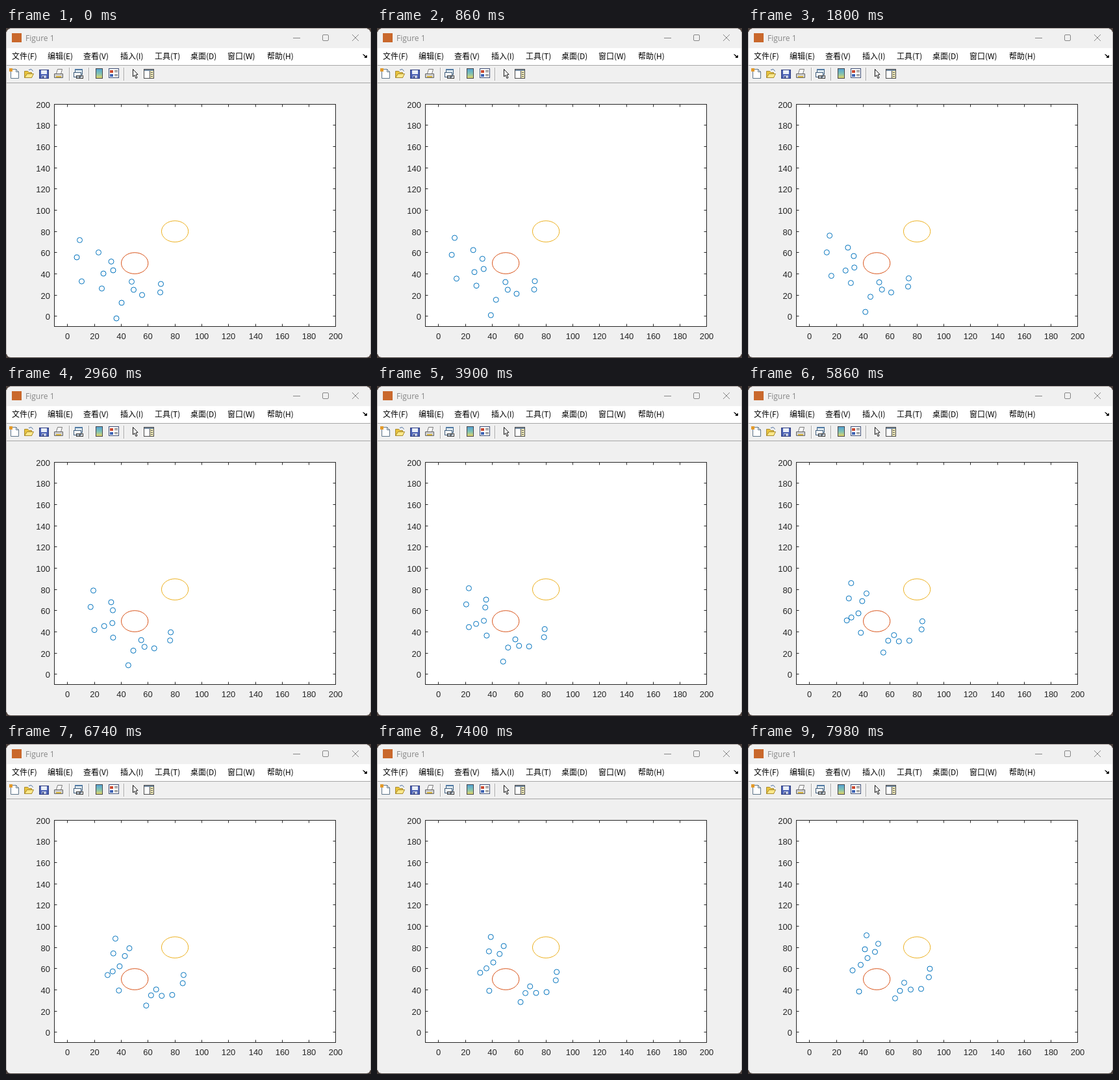
An HTML page with a canvas that plays this animation: 562x508 px, repeating every 8000 ms.

```html
<!DOCTYPE html>
<html lang="zh">
<head>
<meta charset="utf-8">
<title>Figure 1</title>
<style>
html, body { margin: 0; width: 100%; height: 100%; overflow: hidden; background: #f0f0f0; }
canvas { display: block; width: 562px; height: 508px; }
</style>
</head>
<body>
<canvas id="stage" width="562" height="508"></canvas>
<script>
const ctx = document.getElementById('stage').getContext('2d');
const LOOP = 8000, LAST_STEP = 171;
const PANEL = '#f0f0f0', INK = '#262626', GREY = '#868686', RULE = '#a6a6a6';
const BLUE = '#0072bd', ORANGE = '#d95319', YELLOW = '#edb120';

const AXES = { left: 74.3, right: 507.9, top: 117.3, bottom: 459.98 };
const UNIT_X = (AXES.right - AXES.left) / 210;
const UNIT_Y = (AXES.bottom - AXES.top) / 210;
const px = x => AXES.left + (x + 10) * UNIT_X;
const py = y => AXES.bottom - (y + 10) * UNIT_Y;
const snap = v => Math.floor(v) + .5;
const clamp = v => Math.max(0, Math.min(1, v));

const goal = { x: 607, y: 43 };
const obstacle = { x: px(50), y: py(50) };

// Each agent: start x, y and end x, y
const agents = [
  [113.5, 326.5, 182.5, 294.5], [109, 353, 180, 316], [142.5, 345.5, 200.5, 307.5],
  [162, 359.5, 195.5, 320], [165, 373, 184, 329.5], [150, 378, 173.5, 340],
  [116.5, 390, 161, 348.5], [147.5, 401, 171, 381], [193.5, 390.5, 240.5, 367.5],
  [196.5, 403, 250.5, 378], [209.5, 411, 266.5, 377], [178, 423, 234, 380],
  [170, 447, 226.5, 391.5], [238.5, 394, 280, 346], [237.5, 407, 278.5, 359]
];

// Pull towards the goal, plus a push back from the obstacle when heading at it
function startVelocity(x, y) {
  const dx = x - obstacle.x, dy = y - obstacle.y, d = Math.hypot(dx, dy);
  const heading = clamp((-.8 * dx + .6 * dy) / d);
  const push = .36 * heading * clamp((58 - d) / 8);
  return [(goal.x - x) * .00064 + push * dx / d, (goal.y - y) * .00064 + push * dy / d];
}

// Leave with the starting velocity, then bend into the end point
function place([x0, y0, x1, y1], n) {
  const [vx, vy] = startVelocity(x0, y0);
  const bend = (n / LAST_STEP) ** 3;
  return [
    x0 + vx * n + (x1 - x0 - vx * LAST_STEP) * bend,
    y0 + vy * n + (y1 - y0 - vy * LAST_STEP) * bend
  ];
}

// Three steps every 140 ms, held for 20, 100 and 20 ms
function stepAt(t) {
  const r = t % 140;
  return 3 * Math.floor(t / 140) + (r >= 120 ? 2 : r >= 20 ? 1 : 0);
}

function fill(x, y, w, h, color) {
  ctx.fillStyle = color;
  ctx.fillRect(x, y, w, h);
}

function box(x, y, w, h, color, edge) {
  fill(x, y, w, h, color);
  ctx.strokeStyle = edge;
  ctx.lineWidth = 1;
  ctx.strokeRect(x + .5, y + .5, w - 1, h - 1);
}

function trace(p) {
  ctx.beginPath();
  for (let i = 0; i < p.length; i += 2) ctx.lineTo(p[i], p[i + 1]);
}

function line(color, ...p) {
  trace(p);
  ctx.strokeStyle = color;
  ctx.lineWidth = 1;
  ctx.stroke();
}

function poly(color, edge, ...p) {
  trace(p);
  ctx.closePath();
  ctx.fillStyle = color;
  ctx.fill();
  ctx.strokeStyle = edge;
  ctx.lineWidth = 1;
  ctx.stroke();
}

function ring(x, y, rx, ry, color) {
  ctx.strokeStyle = color;
  ctx.lineWidth = 1;
  ctx.beginPath();
  ctx.ellipse(x, y, rx, ry, 0, 0, 7);
  ctx.stroke();
}

function text(s, x, y, font, color, align = 'left') {
  ctx.font = font;
  ctx.fillStyle = color;
  ctx.textAlign = align;
  ctx.fillText(s, x, y);
}

function drawWindow() {
  fill(0, 0, 562, 508, '#4a403c');
  ctx.fillStyle = PANEL;
  ctx.beginPath();
  ctx.roundRect(1, 1, 560, 506, 6);
  ctx.fill();
  line('#a39a98', 6, .5, 556, .5);
  line('#bdb8b8', .5, 6, .5, 502);
  line('#bdb8b8', 561.5, 6, 561.5, 502);

  fill(9, 8, 15, 14, '#c9682c');
  text('Figure 1', 30, 20, '12px "Open Sans", sans-serif', GREY);
  line(GREY, 442, 15.5, 453, 15.5);
  ctx.beginPath();
  ctx.roundRect(487.5, 10.5, 9, 9, 1.5);
  ctx.stroke();
  line(GREY, 533, 10, 543, 20);
  line(GREY, 543, 10, 533, 20);

  fill(1, 31, 560, 26, '#fff');
  const menu = { '文件(F)': 9, '编辑(E)': 64, '查看(V)': 119, '插入(I)': 176,
    '工具(T)': 229, '桌面(D)': 284, '窗口(W)': 341, '帮助(H)': 402 };
  for (const s in menu) text(s, menu[s], 48, '12px "Noto Sans CJK SC", "Noto Sans CJK", sans-serif', '#000');
  line('#111', 549.5, 40.5, 554, 45);
  line('#111', 550.5, 40.5, 555, 45);
  poly('#111', '#111', 555.5, 42, 555.5, 45.5, 552, 45.5);

  for (const y of [57.5, 84.5]) line(RULE, 1, y, 561, y);
  for (const x of [97.5, 127.5, 181.5]) {
    line(RULE, x, 61, x, 81);
    line('#fff', x + 1, 61, x + 1, 81);
  }
}

function drawTools() {
  // New
  poly('#fff', '#5d7488', 7.5, 63.5, 15.5, 63.5, 19.5, 67.5, 19.5, 77.5, 7.5, 77.5);
  line('#5d7488', 15.5, 63.5, 15.5, 67.5, 19.5, 67.5);
  fill(5, 62, 5, 5, '#e39a2a');
  // Open
  poly('#e8c33c', '#a88a30', 28.5, 76.5, 28.5, 66.5, 33.5, 66.5, 35.5, 68.5, 39.5, 68.5, 39.5, 76.5);
  poly('#fbe88a', '#a88a30', 28.5, 76.5, 32.5, 70.5, 42.5, 70.5, 39.5, 76.5);
  line('#4b6fa0', 35, 64.5, 39, 63.5, 41.5, 66.5);
  // Save
  box(51, 64, 15, 14, '#4a60b4', '#2f3d80');
  fill(54, 65, 9, 6, '#e8eef8');
  fill(55, 73, 7, 4, '#c4cce0');
  fill(56, 74, 2, 3, '#2f3d80');
  // Print
  poly('#fff', '#777', 79.5, 63.5, 86.5, 63.5, 84.5, 70.5, 77.5, 70.5);
  poly('#d0d0d0', '#666', 74.5, 70.5, 87.5, 70.5, 87.5, 76.5, 74.5, 76.5);
  fill(77, 74, 8, 2, '#d8b53a');
  // Link
  box(106, 63, 12, 9, '#e3edf2', '#3f5d7c');
  fill(106, 63, 12, 2, '#4f79a4');
  box(104, 68, 12, 8, '#f7f9fa', '#3f5d7c');
  ctx.strokeStyle = '#333';
  ctx.strokeRect(108.5, 73.5, 5, 4);
  ctx.strokeRect(113.5, 73.5, 5, 4);
  // Colour bar
  const grad = ctx.createLinearGradient(0, 63, 0, 78);
  grad.addColorStop(0, '#54a3d4');
  grad.addColorStop(.5, '#83c3b0');
  grad.addColorStop(1, '#f0d65c');
  box(138, 62, 11, 16, grad, '#46464a');
  // Legend
  box(158, 62, 16, 15, '#fff', '#3f4f76');
  fill(160, 65, 5, 4, '#c8472f');
  fill(160, 71, 5, 4, '#3c62b4');
  for (const y of [65.5, 67.5, 71.5, 73.5]) line('#666', 167, y, 172, y);
  // Pointer
  poly('#fff', '#111', 195.5, 63.5, 195.5, 75, 198, 72.5, 200, 77.5, 202, 76.5, 200, 72, 203, 71.5);
  // Inspector
  box(212, 63, 16, 15, '#fff', '#4b4b4b');
  fill(213, 64, 14, 2, '#7088a0');
  line('#4b4b4b', 221.5, 66, 221.5, 77);
  fill(222, 66, 5, 11, '#efe9b8');
  for (const y of [68.5, 71.5, 74.5]) line('#555', 223, y, 226, y);
}

function drawAxes() {
  const [left, right, top, bottom] = Object.values(AXES).map(snap);
  const font = '13px "Liberation Sans", Arial, sans-serif';
  box(left - .5, top - .5, right - left + 1, bottom - top + 1, '#fff', INK);
  for (let v = 0; v <= 200; v += 20) {
    const x = snap(px(v)), y = snap(py(v));
    line(INK, x, bottom, x, bottom - 4);
    line(INK, x, top, x, top + 4);
    line(INK, left, y, left + 4, y);
    line(INK, right, y, right - 4, y);
    text(v, x, 479, font, INK, 'center');
    text(v, 68, y + 5, font, INK, 'right');
  }
}

function drawSwarm(n) {
  ring(obstacle.x, obstacle.y, 10 * UNIT_X, 10 * UNIT_Y, ORANGE);
  ring(px(80), py(80), 10 * UNIT_X, 10 * UNIT_Y, YELLOW);
  for (const agent of agents) ring(...place(agent, n), 4, 4, BLUE);
}

const start = performance.now();
function frame() {
  const t = (performance.now() - start) % LOOP;
  drawWindow();
  drawTools();
  drawAxes();
  drawSwarm(stepAt(t));
  requestAnimationFrame(frame);
}
frame();
</script>
</body>
</html>
```
